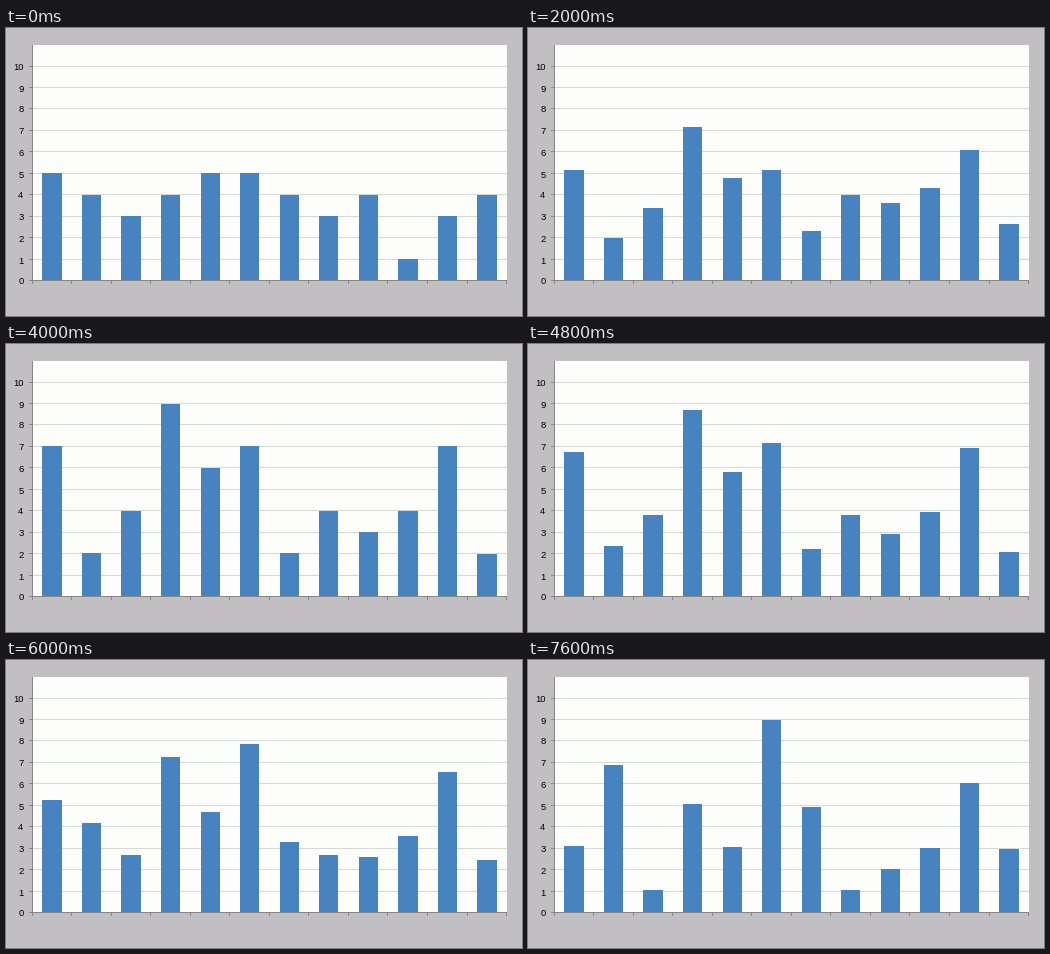
A matplotlib script that plays this animation: 516x288 px, repeating every 8 s.

```python
import math

import matplotlib.pyplot as plt
import numpy as np
from matplotlib.animation import FuncAnimation
from matplotlib.patches import Rectangle

W, H, DPI = 516, 288, 100
FRAMES, INTERVAL = 20, 400
LEFT, RIGHT, TOP, BASE = 26, 501, 17, 252
SLOT, BAR = 39.55, 19.25          # category pitch and bar width
AXIS = "#868686"


def dip(start, low, end, depth):
    """Triangular notch over the categories."""
    return np.interp(k, [start, low, end], [0, depth, 0])


# Chart values the bars pass through, one per category.
k = np.arange(12)
OPENING = 3 + abs(k % 5 - 2) - dip(8, 9, 11, 4)
LOW = np.rint(np.interp(k, [0, 3, 5, 7.5, 11], [1, 3, 1, 5, 4]))
PEAK = np.resize([7, 2, 4, 9, 6], 12) - dip(7, 8, 9.5, 6)
CLOSING = np.array([3, 7, 1, 5, 3, 9, 5, 1, 2, 3, 6, 3])

fig = plt.figure(figsize=(W / DPI, H / DPI), dpi=DPI, facecolor="#c2bfc2")
ax = fig.add_axes([0, 0, 1, 1])
ax.set(xlim=(0, W), ylim=(H, 0))
ax.axis("off")


def box(x0, y0, x1, y1, color, z=1):
    patch = Rectangle((x0, y0), x1 - x0, y1 - y0, facecolor=color,
                      linewidth=0, antialiased=False, zorder=z)
    return ax.add_patch(patch)


def level(value):
    return BASE + 0.45 - 21.44 * value


def glide(time, start, duration):
    u = np.clip((time - start) / duration, 0, 1)
    return (1 - np.cos(np.pi * u ** 1.25)) / 2


def heights(time):
    if time < 400:
        return OPENING
    if time < 4000:
        return LOW + (PEAK - LOW) * glide(time, -540, 3700)
    return PEAK + (CLOSING - PEAK) * glide(time, 3800, 4100)


box(LEFT, TOP, RIGHT, BASE, "#fdfefc")
for value in range(11):
    y = math.floor(level(value))
    if value:
        box(LEFT, y, RIGHT, y + 1, "#d3dad1", 2)
    box(LEFT - 3, y, LEFT, y + 1, AXIS, 4)
    ax.text(17.5, y + 1, str(value), ha="right", va="center_baseline",
            family="Liberation Sans", fontsize=9.5 * 72 / DPI, color="black")

bars = []
for i in range(12):
    x = LEFT + 10.35 + SLOT * i
    bars.append(box(round(x), BASE, round(x + BAR), BASE, "#4683c0", 3))

box(LEFT, TOP, LEFT + 1, BASE + 1, AXIS, 4)
box(LEFT, BASE, RIGHT, BASE + 1, AXIS, 4)
for i in range(13):
    x = int(LEFT + SLOT * i)
    box(x, BASE, x + 1, BASE + 4, AXIS, 4)


def update(frame):
    for bar, value in zip(bars, heights(frame * INTERVAL)):
        top = round(level(value))
        bar.set_y(top)
        bar.set_height(BASE - top)
    return bars


anim = FuncAnimation(fig, update, frames=FRAMES, interval=INTERVAL,
                     repeat=True, repeat_delay=0, blit=False)
plt.show()
```
